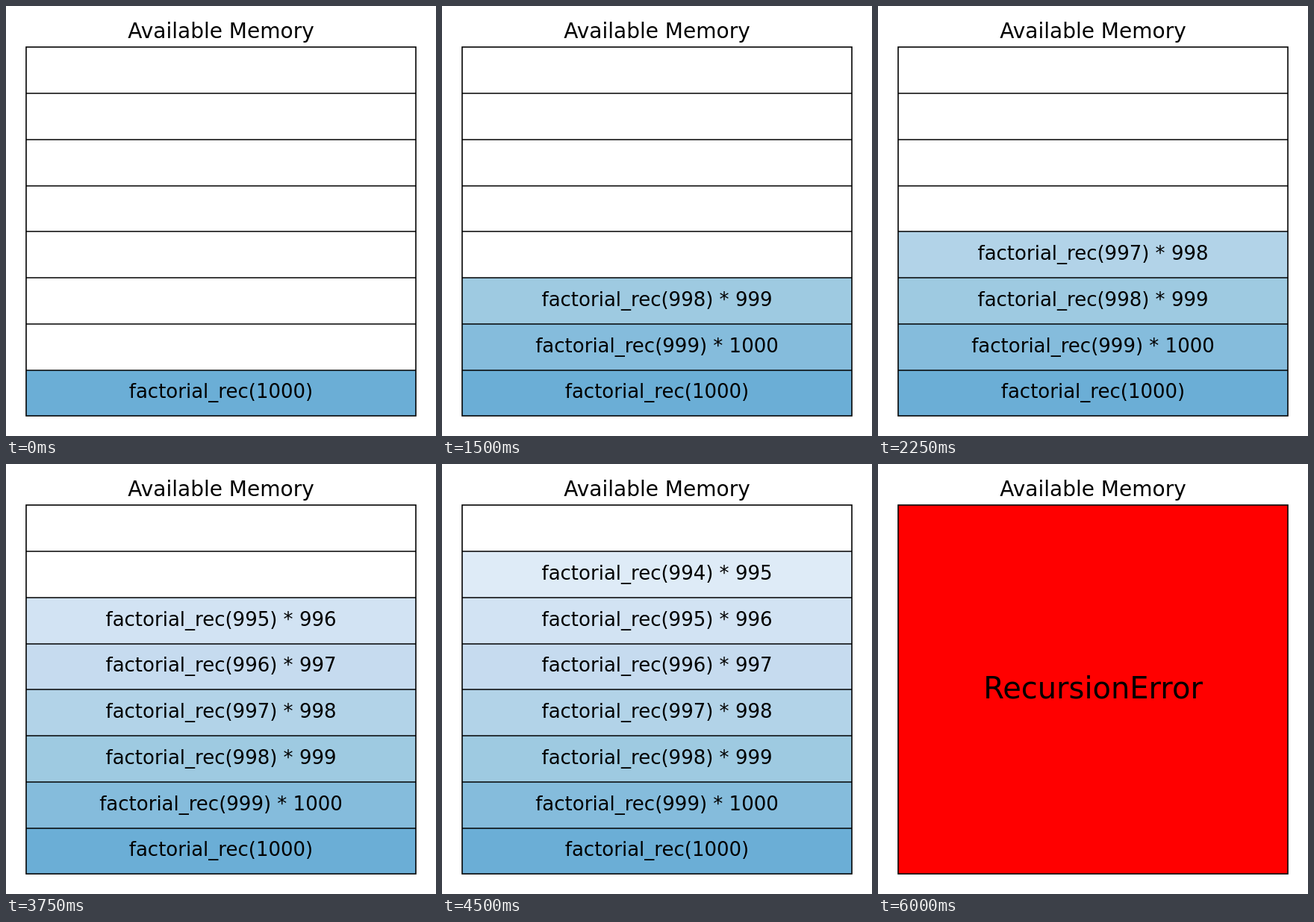
Animation of 576x576 px, one loop 8.25 s. Source, as an HTML page:

```html
<!DOCTYPE html>
<html lang="en">
<head>
<meta charset="utf-8">
<title>Available Memory</title>
<style>
  @property --step {
    syntax: "<integer>";
    inherits: true;
    initial-value: 0;
  }
  html, body { margin: 0; width: 100%; height: 100%; overflow: hidden; background: #fff; }
  svg {
    display: block;
    width: 576px;
    height: 576px;
    font-family: "DejaVu Sans", sans-serif;
    text-anchor: middle;
    animation: count 8250ms steps(11) infinite;
  }
  /* Opacity clamps to 0..1, so a part appears once --step reaches --at. */
  .timed { opacity: calc(var(--step) - var(--at) + 1); }
  .line { fill: none; stroke: #000; stroke-width: 1.6; }
  #rows text { font-size: 26px; }
  @keyframes count { from { --step: 0; } to { --step: 11; } }
</style>
</head>
<body>
<svg viewBox="0 0 576 576">
  <text x="288" y="43" font-size="28">Available Memory</text>
  <g id="rows"></g>
  <path id="grid" class="line"/>
  <g class="timed" style="--at: 8">
    <rect x="27" y="55" width="522" height="494" fill="#f00"/>
    <text x="288" y="314" font-size="40">RecursionError</text>
  </g>
  <rect class="line" x="27" y="55" width="522" height="494"/>
</svg>
<script>
  const colors = ["#6baed6", "#85bcdc", "#9ecae1", "#b2d3e8", "#c6dbef", "#d2e3f3", "#deebf7", "#ebf3fb"];
  const rows = document.getElementById("rows");
  const edge = k => Math.round(55.3 + 61.75 * k);
  const baseline = k => Math.round(93.07 + 61.75 * k);

  function add(parent, tag, attrs, text = "") {
    const el = document.createElementNS(rows.namespaceURI, tag);
    for (const key in attrs) el.setAttribute(key, attrs[key]);
    el.textContent = text;
    return parent.appendChild(el);
  }

  let grid = "";
  colors.forEach((fill, i) => {
    const k = 7 - i, top = edge(k), n = 1000 - i;
    const row = add(rows, "g", { class: "timed", style: `--at: ${i}` });
    add(row, "rect", { x: 27, y: top, width: 522, height: edge(k + 1) - top, fill });
    add(row, "text", { x: 288, y: baseline(k) }, `factorial_rec(${n})` + (i ? ` * ${n + 1}` : ""));
    if (k) grid += `M27 ${top}H549`;
  });
  document.getElementById("grid").setAttribute("d", grid);
</script>
</body>
</html>
```
